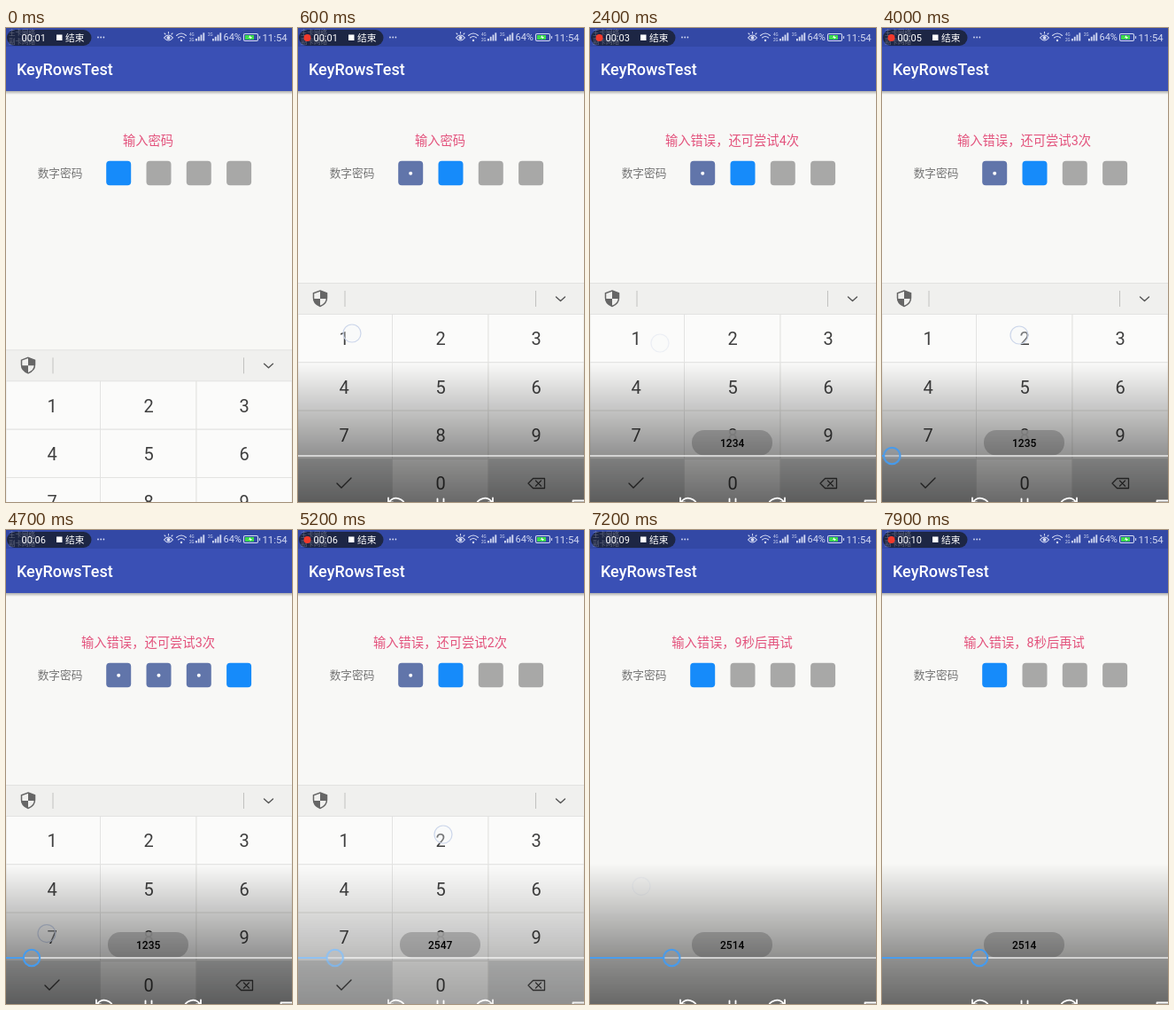
Recreate the animation shown at these times as an HTML page. Size 323 by 534 pixels, loop 8000 ms.

```html
<!DOCTYPE html>
<html lang="zh">
<head>
<meta charset="utf-8">
<title>PIN entry</title>
<style>
html, body { margin: 0; width: 100%; height: 100%; overflow: hidden; background: #f8f8f6; }
svg { display: block; width: 323px; height: 534px; font-family: Roboto, "Noto Sans CJK SC", "Noto Sans CJK", sans-serif; }
.mid { text-anchor: middle; }
.line { fill: none; stroke-linecap: round; stroke-linejoin: round; }
#keyboard { animation: slide 8s infinite; }
#controls { animation: fade 8s linear infinite; }
#knob { animation: seek 8s linear infinite; }
@keyframes slide {
  0% { transform: translateY(76px); animation-timing-function: ease-out; }
  2.5%, 86.5% { transform: none; animation-timing-function: ease-in; }
  90%, 100% { transform: translateY(250px); }
}
@keyframes fade {
  0%, 1.5% { opacity: 0; }
  5%, 60% { opacity: 1; }
  63% { opacity: .4; }
  65% { opacity: .6; }
  68%, 100% { opacity: 1; }
}
@keyframes seek {
  from { transform: translateX(-90px); }
  to { transform: translateX(112.5px); }
}
</style>
</head>
<body>
<svg viewBox="0 0 323 534">
  <defs>
    <linearGradient id="shade" x1="0" y1="0" x2="0" y2="1">
      <stop offset="0" stop-opacity="0"/>
      <stop offset=".65" stop-opacity=".41"/>
      <stop offset="1" stop-opacity=".58"/>
    </linearGradient>
    <linearGradient id="drop" x1="0" y1="0" x2="0" y2="1">
      <stop offset="0" stop-opacity=".3"/>
      <stop offset="1" stop-opacity="0"/>
    </linearGradient>
  </defs>

  <rect width="323" height="534" fill="#f8f8f6"/>
  <rect width="323" height="71" fill="#3a50b5"/>
  <rect width="323" height="21" fill="#3348a5"/>
  <rect y="71" width="323" height="4" fill="url(#drop)"/>
  <text x="12" y="53" font-size="18" font-weight="500" fill="#fff">KeyRowsTest</text>

  <!-- status bar -->
  <rect x="1" y="2" width="95.5" height="18" rx="9" fill="#1d2644"/>
  <g font-size="7.5" fill="#fff" opacity=".3">
    <text x="3" y="8">主卡网络</text>
    <text x="3" y="18">副卡网络</text>
  </g>
  <circle id="rec" cx="10.5" cy="11" r="4" fill="#f0392b"/>
  <g fill="#fff" font-size="11">
    <text id="clock" x="17.5" y="15"></text>
    <rect x="57" y="7.5" width="6.5" height="6.5"/>
    <text x="67" y="15" font-size="10.7" font-weight="500">结束</text>
  </g>
  <g fill="#d5dbf3">
    <circle cx="104" cy="10.5" r=".9"/><circle cx="107.2" cy="10.5" r=".9"/><circle cx="110.4" cy="10.5" r=".9"/>
    <circle cx="183.5" cy="11" r="2"/>
    <circle cx="198" cy="14" r="1.2"/>
    <g id="bars"></g>
    <g font-size="4.6">
      <text x="207" y="9">4G</text><text x="207" y="14.5">2G</text><text x="228" y="9">2G</text>
    </g>
    <text x="245.5" y="14" font-size="11">64%</text>
    <text x="289.5" y="14.5" font-size="11.3">11:54</text>
  </g>
  <g class="line" stroke="#d5dbf3" stroke-width="1.1">
    <path d="M178.5 11Q183.5 5 188.5 11Q183.5 17 178.5 11ZM180 7l-1-1M183.5 6V4.5M187 7l1-1"/>
    <path d="M192.5 8.5Q198 3.5 203.5 8.5M194.5 11Q198 8 201.5 11"/>
    <rect x="268.5" y="6.5" width="16" height="8" rx="1.5"/>
    <path d="M286.5 9.5v2"/>
  </g>
  <rect x="270" y="8" width="10" height="5" fill="#3ddc4e"/>
  <path d="M276 8l-2 3h2l-.5 2 2.5-3h-2z" fill="#fff"/>

  <!-- form -->
  <text id="message" class="mid" x="160.5" y="132" font-size="14.3" fill="#e3527c"></text>
  <text x="35.7" y="168" font-size="12.7" fill="#757575">数字密码</text>
  <g id="pins"></g>

  <g id="keyboard">
    <rect y="287.5" width="323" height="250" fill="#f0f0ee"/>
    <path d="M0 287.5H323" stroke="#e2e2e0"/>
    <path d="M25 296l7.5 2.8v5.2c0 4.5-3 7.8-7.5 9.5c-4.5-1.7-7.5-5-7.5-9.5v-5.2z" fill="#f0f0ee" stroke="#666" stroke-width="1.5"/>
    <path d="M25 296v9h7.5v-6.2zM25 305h-7.5c.3 4 3 6.8 7.5 8.5z" fill="#666"/>
    <path d="M53 296v18M268.5 296v18" stroke="#c2c2c0"/>
    <path class="line" d="M291.5 303l5 4.5 5-4.5" stroke="#555" stroke-width="1.4"/>
    <g id="keys"></g>
    <path class="line" d="M44 513l5 5 11-11" stroke="#444" stroke-width="1.4"/>
    <path class="line" d="M260 513l5.5-5.5h13v11h-13zM268.5 510l6 6M274.5 510l-6 6" stroke="#444" stroke-width="1.3"/>
  </g>

  <circle id="touch" r="10" fill="#f4f7fb" fill-opacity=".3" stroke="#ccd6ea" stroke-width="1.2"/>

  <g id="toast">
    <rect x="115" y="453" width="91" height="28.5" rx="14" fill="#c4c4c4" fill-opacity=".9"/>
    <text id="toastText" class="mid" x="160.7" y="471.5" font-size="12" font-weight="500"></text>
  </g>

  <!-- player controls -->
  <g id="controls">
    <rect y="376" width="323" height="158" fill="url(#shade)"/>
    <rect y="481" width="323" height="2" fill="#fff" fill-opacity=".6"/>
    <g id="knob">
      <rect x="-400" y="481" width="391" height="2" fill="#4a9ded"/>
      <circle cy="482" r="9.2" fill="#8f979f" fill-opacity=".4" stroke="#459bee" stroke-width="2.1"/>
    </g>
    <g class="line" stroke="#fff" stroke-width="1.8">
      <path d="M103 534A10 10 0 0 1 121 538M102 529.5v5h5"/>
      <path d="M219 534A10 10 0 0 0 201 538M220 529.5v5h-5"/>
      <path d="M157.5 530.5v8M164.5 530.5v8"/>
      <path d="M310.5 538v-5.5h16"/>
    </g>
  </g>
</svg>

<script>
const LOOP = 8000, ROW = 54.3;
const $ = id => document.getElementById(id);
const colX = [52, 161, 269], colEdge = [0, 106.5, 215, 323];

// dx, dy: where the finger lands relative to the key centre
const tries = [
  { code: '1234', taps: [500, 900, 1300, 1700], dx: 9, dy: -6 },
  { code: '1235', taps: [2120, 2500, 2900, 3300], dx: 27, dy: 5 },
  { code: '2547', taps: [3850, 4150, 4450, 4750], dx: -6, dy: -4 },
  { code: '2589', taps: [5080, 5380, 5680, 5950], dx: 3, dy: -7 },
  { code: '2514', taps: [6280, 6500, 6700, 6900], dx: 6, dy: -3 }
];
const taps = tries.flatMap(a => a.taps.map((time, i) => {
  const k = a.code[i] - 1;
  return { time, x: colX[k % 3] + a.dx, y: 350 + ROW * Math.floor(k / 3) + a.dy };
}));

function add(parent, tag, attrs, text = '') {
  const el = document.createElementNS('http://www.w3.org/2000/svg', tag);
  for (const name in attrs) el.setAttribute(name, attrs[name]);
  el.textContent = text;
  return parent.appendChild(el);
}

const clamp = v => Math.min(1, Math.max(0, v));

for (const x of [214, 233])
  for (let i = 0; i < 4; i++)
    add($('bars'), 'rect', { x: x + i * 2.8, y: 12 - i * 2.2, width: 1.8, height: 2.5 + i * 2.2 });

for (let row = 0; row < 4; row++)
  for (let col = 0; col < 3; col++) {
    const special = row === 3 && col !== 1;
    add($('keys'), 'rect', {
      x: colEdge[col], y: 322.5 + row * ROW, width: colEdge[col + 1] - colEdge[col], height: ROW,
      fill: special ? '#dcdddd' : '#fbfbfa', stroke: '#e2e2e0', 'stroke-width': .9
    });
    if (!special) add($('keys'), 'text', {
      class: 'mid', x: colX[col], y: 357.3 + row * ROW, 'font-size': 20, fill: '#404040'
    }, row === 3 ? '0' : row * 3 + col + 1);
  }

const pins = [0, 1, 2, 3].map(i => {
  const x = 113.2 + i * 45.3;
  return {
    box: add($('pins'), 'rect', { x, y: 149.7, width: 28, height: 27.6, rx: 4 }),
    dot: add($('pins'), 'circle', { cx: x + 14, cy: 163.8, r: 2, fill: '#fff' })
  };
});

function message(done, t) {
  if (!done) return '输入密码';
  if (done < 5) return `输入错误，还可尝试${5 - done}次`;
  return `输入错误，${t < 7800 ? 9 : 8}秒后再试`;
}

function render(t) {
  const sec = 1.12 + t * .00113, part = sec % 1;
  $('clock').textContent = '00:' + String(Math.floor(sec)).padStart(2, '0');
  $('rec').style.opacity = part >= .1 && part < .6 ? 0 : 1;

  const count = taps.filter(p => p.time <= t).length;
  const done = Math.floor(count / 4), filled = count % 4;
  $('message').textContent = message(done, t);
  pins.forEach((p, i) => {
    p.box.style.fill = i < filled ? '#6175aa' : i === filled ? '#168bfa' : '#a8a8a7';
    p.dot.style.opacity = i < filled ? 1 : 0;
  });

  const tap = taps.findLast(p => p.time - 60 <= t);
  $('touch').style.opacity = tap ? clamp((tap.time + 330 - t) / 150) : 0;
  if (tap) {
    $('touch').setAttribute('cx', tap.x);
    $('touch').setAttribute('cy', tap.y);
  }

  const shown = done && tries[done - 1];
  $('toast').style.opacity = shown ? clamp((t - shown.taps[3]) / 150) : 0;
  $('toastText').textContent = shown ? shown.code : '';
}

let start;
function frame(now) {
  start ??= now;
  render((now - start) % LOOP);
  requestAnimationFrame(frame);
}
render(0);
requestAnimationFrame(frame);
</script>
</body>
</html>
```
